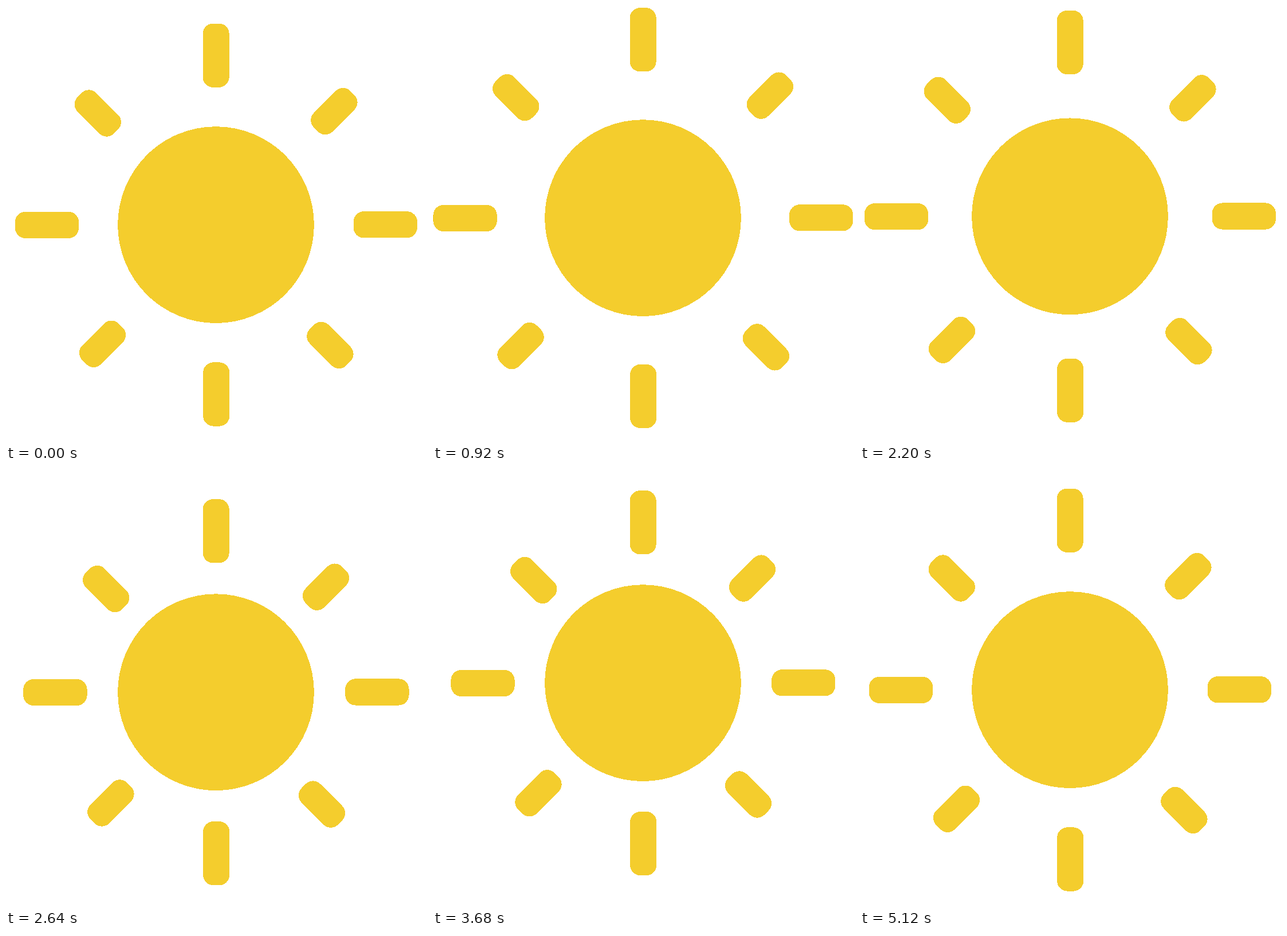
Write an HTML page that moves like this. It is 735 px wide and 762 px high and loops after 5.76 s.

```html
<!DOCTYPE html>
<html>
<head>
<meta charset="utf-8">
<title>Sun</title>
<style>
  html, body { margin: 0; width: 100%; height: 100%; overflow: hidden; background: #fff; }
  svg { display: block; width: 100%; height: 100%; }
</style>
</head>
<body>
<svg viewBox="0 0 735 762" fill="#f4cd2d" shape-rendering="crispEdges">
  <g id="sun">
    <circle cx="366.5" cy="381.6" r="171.4"/>
  </g>
</svg>
<script>
const NS = 'http://www.w3.org/2000/svg';
const STEP = 40, LOOP = 5760, AMP = 16;
const CX = 366.9, CY = 381.6, WIDE = 46.2;

const sun = document.getElementById('sun');
const rays = Array.from({ length: 8 }, (_, i) => makeRay(i * 45));

function makeRay(angle) {
  const rad = angle * Math.PI / 180;
  const dx = Math.round(Math.cos(rad)), dy = Math.round(Math.sin(rad));
  const lean = dx * dy;             // 0 for upright and level rays
  const len = lean ? 90 : 111.3;
  const reach = lean ? 202.5 : 295.4;
  const el = document.createElementNS(NS, 'rect');
  const attrs = { x: -len / 2, y: -WIDE / 2, width: len, height: WIDE, rx: 18 };
  for (const key in attrs) el.setAttribute(key, attrs[key]);
  sun.appendChild(el);
  return {
    el, dx, dy, angle,
    x: CX + reach * dx + 0.3 * dy - 3.8 * lean,
    y: CY + reach * dy - 0.3 * dx + 1.4 * lean + 6.2 * Math.abs(lean)
  };
}

// Two runs of four swings between -1 and 1, from rest and back to rest.
function shake(n, swing, rerun, first) {
  let n0 = 0, v0 = 0;
  for (let k = 1; k <= 9; k++) {
    const n1 = k > 4 ? rerun + (k - 4) * swing : k * swing;
    const v1 = k === 9 ? 0 : k % 2 ? first : -first;
    if (n < n1) {
      const p = (1 - Math.cos(Math.PI * (n - n0) / (n1 - n0))) / 2;
      return v0 + (v1 - v0) * p;
    }
    n0 = n1;
    v0 = v1;
  }
  return 0;
}

function draw(ms) {
  const n = Math.floor((ms % LOOP) / STEP);
  const out = AMP * shake(n, 12, 57, -1);
  const drop = AMP * shake(n, 13, 63, 1);
  sun.setAttribute('transform', `translate(0 ${drop})`);
  for (const r of rays) {
    r.el.setAttribute('transform',
      `translate(${r.x + r.dx * out} ${r.y + r.dy * out}) rotate(${r.angle})`);
  }
}

let start;
function tick(now) {
  if (start === undefined) start = now;
  draw(now - start);
  requestAnimationFrame(tick);
}
draw(0);
requestAnimationFrame(tick);
</script>
</body>
</html>
```
